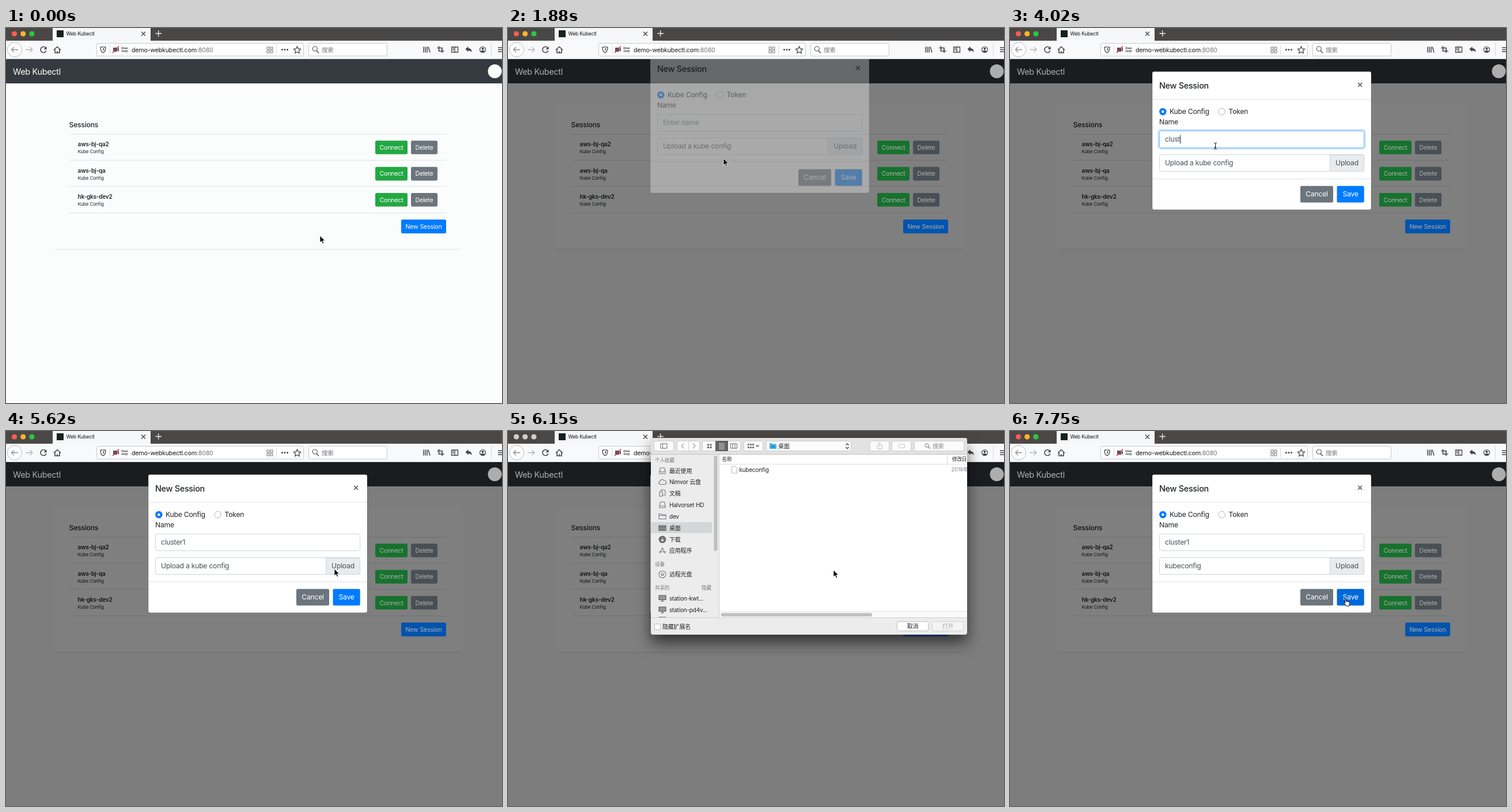
Animation of 861x650 px, one loop 8 s. Source, as an HTML page:

```html
<!DOCTYPE html>
<html lang="en">
<head>
<meta charset="utf-8">
<title>Web Kubectl</title>
<style>
html, body { margin: 0; width: 100%; height: 100%; overflow: hidden; background: #fbfcfc; }
svg { display: block; width: 861px; height: 650px; }
text { font-family: Inter, "Noto Sans CJK SC", "Noto Sans CJK", sans-serif; letter-spacing: -.02em; white-space: pre; }
#card { fill: #fbfcfc; }
.dim #card { fill: #fff; }
.dim .lit { filter: brightness(.68); }
#backdrop { visibility: hidden; }
.dim #backdrop { visibility: visible; }
.line { fill: none; stroke: #45454a; stroke-width: 1.3; }
</style>
</head>
<body>
<svg id="stage" viewBox="0 0 861 650"></svg>
<script>
const INK = '#212529', RULE = '#dee2e6', BLUE = '#007bff', BLUE_HOVER = '#0069d9', GREY = '#6c757d';

const rect = (x, y, w, h, fill, more = '') =>
  `<rect x="${x}" y="${y}" width="${w}" height="${h}" fill="${fill}" ${more}/>`;
const box = (x, y, w, h, fill, stroke, rx = 3, more = '') =>
  rect(x + .5, y + .5, w - 1, h - 1, fill, `stroke="${stroke}" rx="${rx}" ${more}`);
const circle = (x, y, r, fill, more = '') => `<circle cx="${x}" cy="${y}" r="${r}" fill="${fill}" ${more}/>`;
const line = (d, more = '') => `<path class="line" d="${d}" ${more}/>`;
const shape = (d, fill, more = '') => `<path d="${d}" fill="${fill}" ${more}/>`;
// y is the middle of the capital letters
const text = (x, y, s, size, fill = INK, more = '') =>
  `<text x="${x}" y="${y + size * .36}" font-size="${size}" fill="${fill}" ${more}>${s}</text>`;
const group = (id, inner, more = '') => `<g id="${id}" ${more}>${inner}</g>`;
const button = (x, y, w, h, fill, label, size, id = '') =>
  rect(x, y, w, h, fill, `rx="2.3" ${id && `id="${id}"`}`) +
  text(x + w / 2, y + h / 2, label, size, '#fff', 'text-anchor="middle"');

const LIGHTS = ['#fc5b53', '#fdb528', '#2ac840'];

function chrome() {
  return rect(0, 0, 861, 22, '#4a4846') + rect(81, 0, 170, 22, '#f6f7f8') +
    LIGHTS.map((c, i) => circle(14.5 + i * 15.2, 10, 4.6, c, 'class="light"')).join('') +
    rect(88, 4, 12, 12, '#16211c') +
    text(104.5, 10, 'Web Kubectl', 8.5, '#111') +
    line('M235 6.5l7 7m0-7l-7 7') +
    line('M259.5 9.5h10.5M264.7 4.3v10.5', 'style="stroke:#eee"') +
    rect(0, 22, 861, 31, '#f8f9fa') + rect(0, 53, 861, 1, '#c9cbcc') +
    circle(15, 37.5, 12.6, '#fdfdfd', 'stroke="#bbb"') +
    line('M21 37.5H9.5m4.5-4.5l-4.5 4.5l4.5 4.5', 'style="stroke:#8e8e92"') +
    line('M34.5 37.5H46m-4.5-4.5l4.5 4.5l-4.5 4.5', 'style="stroke:#b5b5b8"') +
    line('M69.2 34.8A5 5 0 1 0 69.8 39', 'style="stroke-width:1.6"') + shape('M70.5 32v5h-5z', '#45454a') +
    line('M83 38l6-5.5l6 5.5M85 37v6h8v-6M89 43v-3', 'style="stroke-width:1.6"') +
    box(157, 26, 360, 23, '#fff', '#c8c9ca', 2) +
    line('M164 33.5q4.500-.5 4.500-1q0 .5 4.500 1q0 7-4.500 9.500q-4.500-2.500-4.500-9.500z') + shape('M168.500 35h2q0 3.500-2 5z', '#45454a') +
    rect(180, 29, 1, 17, '#d8d8da') +
    shape('M186 34h7v7h-7zm7.500 2l2.500-2v7l-2.500-2z', '#55555a') + line('M185 43L196 31.500', 'style="stroke:#d7264c;stroke-width:1.600"') +
    line('M205 35h6.500M200.500 40h6') + circle(202.5, 35, 1.7, 'none', 'stroke="#45454a"') + circle(209, 40, 1.7, 'none', 'stroke="#45454a"') +
    text(218, 38, 'demo-webkubectl.com<tspan fill="#76767a">:8080</tspan>', 10.7, '#18181b') +
    [[452.5, 32.5], [458.5, 32.5], [452.5, 38.5], [458.5, 38.5]].map(([x, y]) => rect(x + .5, y + .5, 4, 4, 'none', 'stroke="#77777a"')).join('') +
    rect(469, 29, 1, 17, '#d8d8da') +
    [479.5, 484, 488.5].map(x => circle(x, 37.5, 1.5, '#45454a')).join('') +
    line('M505.500 32l1.800 3.800l4.200.6l-3 2.900l.7 4.200l-3.700-2l-3.700 2l.7-4.200l-3-2.900l4.200-.6z') +
    box(525, 26, 137, 23, '#fff', '#c8c9ca', 2) +
    circle(536.3, 36, 4, 'none', 'stroke="#55555a" stroke-width="1.2"') + line('M539 39l4 4.500') +
    text(548, 38, '搜索', 10.5, '#77777b') +
    line('M725 32.500v10M728 32.500v10M731 32.500v10M733 32.500l3 10', 'style="stroke-width:1.500"') +
    line('M751.500 31.500v8.500h9M748.500 34.500h8.500v8.500', 'style="stroke-width:1.700"') +
    line('M773.500 33h11v9h-11zM779 33v9M775 35.500h2.500M775 38h2.500') +
    shape('M797.500 36.500l5-4.500v3q6 0 6 7q-2-3-6-3v2.500z', '#45454a') +
    circle(827.5, 37.5, 5, 'none', 'stroke="#45454a" stroke-width="1.200"') + circle(827.5, 36, 2, '#45454a') +
    shape('M823.500 40.500q4-3.500 8 0q-4 3.500-8 0z', '#45454a') +
    rect(842, 26, 1, 23, '#d8d8da') +
    line('M854 34h7M854 37.500h7M854 41h7');
}

const SESSIONS = [['aws-bj-qa2', 184], ['aws-bj-qa', 229.6], ['hk-gks-dev2', 274.8]];

function page() {
  const rows = SESSIONS.map(([name, y]) =>
    rect(110, Math.floor(y) - .3, 654, 1, RULE) +
    text(124.6, y + 17.4, name, 10, INK, 'font-weight="600"') +
    text(124.6, y + 30.3, 'Kube Config', 8)).join('');
  const buttons = SESSIONS.map(([, y]) =>
    button(641, y + 11.2, 56, 23.6, '#22a843', 'Connect', 10.7) +
    button(703, y + 11.2, 46, 23.6, GREY, 'Delete', 10.7)).join('');
  return rect(0, 53, 861, 597, '#fbfcfc') + rect(0, 53, 861, 43, '#343a40') +
    rect(83, 134, 708, 250.3, '#000', 'rx="4" opacity=".12"') +
    rect(82, 133, 710, 250.2, '', 'rx="4" id="card"').replace('fill=""', '') +
    text(109.5, 168, 'Sessions', 12.2, INK, 'font-weight="500"') + rows + rect(110, 320, 654, 1, RULE) +
    rect(0, 53, 861, 597, '#000', 'id="backdrop" opacity=".5"') +
    `<g class="lit">${text(12, 75.5, 'Web Kubectl', 14.4, '#fff')}${circle(848.5, 75, 12, '#fff')}${buttons}` +
    button(686, 332, 78, 24, BLUE, 'New Session', 10.7, 'create') + '</g>';
}

function modal() {
  return rect(247, 75.5, 380, 239.5, '#fff', 'rx="3" stroke="#000" stroke-opacity=".2"') +
    text(259, 100, 'New Session', 14.4, INK, 'font-weight="500"') +
    line('M604.200 95l6.800 6.800m0-6.800l-6.800 6.800', 'style="stroke:#777;stroke-width:2"') +
    rect(247, 123, 380, 1, RULE) + rect(247, 261, 380, 1, RULE) +
    circle(265.3, 145, 6.2, BLUE) + circle(265.3, 145, 2.3, '#fff') + text(277, 145, 'Kube Config', 12.2) +
    circle(367.6, 145, 5.8, '#fff', 'stroke="#adb5bd"') + text(379.5, 145, 'Token', 12.2) +
    text(259, 163, 'Name', 12.2) +
    rect(257.8, 176.8, 358.4, 32.4, 'none', 'id="ring" rx="4.500" stroke="#bfdeff" stroke-width="2.600"') +
    box(259, 178, 356, 30, '#fff', '#ced4da', 3, 'id="field"') +
    text(269, 193, '', 12.2, INK, 'id="name"') + rect(269, 185.5, 1, 15, '#222', 'id="caret"') +
    box(259, 219, 356, 30, '#fff', '#ced4da') + text(269, 234, '', 12.2, '#495057', 'id="file"') +
    shape('M555.500 220H612q2.500 0 2.500 2.500V246q0 2.500-2.500 2.500H555.500z', '#e9ecef', 'stroke="#ced4da"') +
    text(585, 234, 'Upload', 12.2, '#495057', 'text-anchor="middle"') +
    button(504, 273.7, 57, 28.8, GREY, 'Cancel', 12.2) +
    button(567.5, 273.7, 47.2, 28.8, BLUE, 'Save', 12.2, 'save');
}

// sidebar icons are drawn around the origin
const ICONS = {
  tray: 'M-5 5v-5l1.500-5h7l1.500 5v5zM-5 1h3l1 1.500h2l1-1.500h3',
  cloud: 'M-4 4a2.800 2.800 0 0 1 0-5.500a3.800 3.800 0 0 1 7-1a3 3 0 0 1 1 6.500z',
  pages: 'M-5 5v-8h5v8zM-2-3v-3h5l2 2v7h-5',
  disk: 'M-5 5v-3l1.500-7h7l1.500 7v3zM-5 2h10',
  folder: 'M-6 4.500v-9h4l1 1.500h7v7.500zM-6-1.500h12',
  desk: 'M-6-4h12v8.500h-12zM-6-1.500h12M-4 2h8',
  down: 'M0-3v6m-2.500-2.500l2.500 2.500l2.500-2.500',
  apps: 'M-5 5l5-10l5 10M-6.500 2h13',
  disc: 'M-6 0a6 6 0 1 0 12 0a6 6 0 1 0-12 0M-2 0a2 2 0 1 0 4 0a2 2 0 1 0-4 0',
  screen: 'M-6-5h12v7.500h-12zM-3 5h6M0 3v2'
};
const PLACES = [
  ['tray', 69, '最近使用'], ['cloud', 88.5, 'Nimvor 云盘'], ['pages', 108, '文稿'], ['disk', 128, 'Halvorset HD'],
  ['folder', 148, 'dev'], ['desk', 168, '桌面'], ['down', 188, '下载'], ['apps', 207.5, '应用程序'],
  ['disc', 248.5, '远程光盘'], ['screen', 290, 'station-kwt...'], ['screen', 310, 'station-pd4v...']
];

function place([icon, y, label]) {
  const tint = icon === 'down' ? ['#6a6a6a', '#fff'] : icon === 'screen' || icon === 'desk' ? ['none', '#555'] : ['none', '#777'];
  return (icon === 'down' ? circle(268, y, 6.3, tint[0]) : '') +
    `<path transform="translate(268 ${y})" d="${ICONS[icon]}" fill="${icon === 'screen' || icon === 'desk' ? '#999' : 'none'}" stroke="${tint[1]}" stroke-width="1.1"/>` +
    text(280, y, label, 10, '#222');
}

function sheet() {
  const tool = (x, w) => box(x, 17, w, 18, '#fcfcfc', '#cdcdcd');
  const heading = (x, y, s) => text(x, y, s, 8.6, '#777', 'font-weight="500"');
  return rect(248, 12, 549, 341, '#ececec', 'rx="4" style="filter:drop-shadow(0 14px 13px rgba(0,0,0,.6))"') +
    shape('M248 40V16q0-4 4-4H793q4 0 4 4V40z', '#e2e2e2') + rect(248, 40, 549, 1, '#c4c4c4') +
    tool(253, 35) + line('M265 22h11v8h-11zM268.500 22v8', 'style="stroke:#666;stroke-width:1"') +
    tool(293, 40) + rect(313, 17, 1, 18, '#ccc') + line('M305 22l-4 4l4 4M321 22l4 4l-4 4', 'style="stroke:#999;stroke-width:1.100"') +
    tool(337, 67) + rect(360, 17, 22, 18, '#636363') +
    [346, 350.5].map(x => rect(x, 22.5, 3, 3, '#666') + rect(x, 27, 3, 3, '#666')).join('') +
    line('M366 22h10M366 25h10M366 28h10M366 31h10', 'style="stroke:#eee;stroke-width:1"') +
    line('M386.500 22h11v8h-11zM390 22v8M394 22v8', 'style="stroke:#666;stroke-width:1"') +
    tool(409, 34) + [0, 1, 2].map(i => rect(416 + i * 4, 22, 3, 3, '#777') + rect(416 + i * 4, 27, 3, 3, '#777')).join('') +
    line('M430.500 24.500l2.500 2.500l2.500-2.500', 'style="stroke:#555"') +
    tool(448, 148) + shape('M454 21h4l1 1.500h7v8.500h-12z', '#45b4e8') + rect(457, 25, 6, 4, '#2693cb') + text(469, 26, '桌面', 10, '#222') +
    line('M586.500 24.500l2.500-2.500l2.500 2.500M586.500 28l2.500 2.500l2.500-2.500', 'style="stroke:#444"') +
    tool(628, 34) + line('M643 24h-2v7h8v-7h-2M645 28v-8m-2 2l2-2l2 2', 'style="stroke:#bbb;stroke-width:1"') +
    tool(666, 34) + line('M677 26l2.500-3h9v6h-9z', 'style="stroke:#c4c4c4;stroke-width:1"') +
    tool(705, 87) + circle(727, 25, 3.2, 'none', 'stroke="#777"') + line('M729.500 27.500l3 3', 'style="stroke:#777"') + text(737, 26, '搜索', 10, '#888') +
    rect(248, 158, 106, 19, '#d4d7d8') + heading(255, 51, '个人收藏') + heading(255, 231, '设备') +
    heading(255, 272, '共享的') + heading(336, 272, '隐藏') + PLACES.map(place).join('') +
    rect(262, 322, 12, 1.5, '#777') + rect(357.5, 43, 6, 165, '#bfbfbf', 'rx="3"') +
    rect(366, 41, 431, 282, '#fff') + rect(366, 41, 1, 282, '#d0d0d0') +
    text(371.5, 49, '名称', 8.6, '#222') + rect(762, 41, 1, 16, '#d5d5d5') + text(771, 49, '修改日', 8.6, '#222') +
    rect(367, 57, 430, 1, '#ddd') + rect(367, 58, 430, 18.5, '#0b60d8', 'id="pick"') +
    shape('M388.500 61.500h6l3 3v8.500h-9z', '#fff', 'stroke="#b5b5b5"') +
    text(401.5, 67, 'kubeconfig', 10, '#222', 'id="entry"') +
    `<svg x="760" y="58" width="37" height="18">${text(9.5, 9, '2019年', 9.3, '#888', 'id="date"')}</svg>` +
    rect(367, 313, 430, 10, '#fafafa') + rect(367, 312.5, 430, 1, '#e3e3e3') + rect(369.5, 315.5, 262.5, 6, '#bfbfbf', 'rx="3"') +
    rect(248, 323, 549, 1, '#cfcfcf') + box(254, 334, 11, 11, '#fff', '#b5b5b5', 2) + text(268, 339, '隐藏扩展名', 10, '#222') +
    box(675, 330, 55, 17, '#fff', '#c0c0c0') + text(702.5, 338.5, '取消', 10, '#222', 'text-anchor="middle"') +
    box(736, 330, 55, 17, '#f4f4f4', '#d2d2d2', 3, 'id="open"') + text(763.5, 338.5, '打开', 10, '#aaa', 'text-anchor="middle" id="openLabel"');
}

const cursors = group('arrow', shape('M0 0V12l2.800-2.600l1.900 4.400l2-.8l-1.900-4.300H8.500z', '#000', 'stroke="#fff" stroke-width=".8"')) +
  group('hand', shape('M1.500 1q1.300-1 2 .4V5l5.500 1.200q1 .4.800 2l-1 5H4.200L.300 8.800q-.8-1.500.6-1.800l1 .9z', '#fff', 'stroke="#000" stroke-width="1"')) +
  group('beam', line('M-2.500-5.500Q0-5.500 0-4Q0-5.500 2.500-5.500M0-4.500v9M-2.500 5.500Q0 5.500 0 4Q0 5.500 2.500 5.500M-1.500 2h3', 'style="stroke:#111;stroke-width:1"'));

const stage = document.getElementById('stage');
stage.innerHTML = '<clipPath id="view"><rect y="54" width="861" height="596"/></clipPath>' + page() +
  `<g clip-path="url(#view)">${group('modal', modal())}</g>` + chrome() + group('sheet', sheet()) + cursors;

const $ = id => document.getElementById(id);
const lights = [...document.querySelectorAll('.light')];

// time, cursor, x, y, what else changes from here on
const STEPS = [
  [0, 'arrow', 545, 360, { modal: 0, lift: 0, sheet: 0, name: '', file: 'Upload a kube config' }],
  [270, 'arrow', 561, 334],
  [540, 'arrow', 591, 313],
  [810, 'arrow', 631, 304],
  [1070, 'hand', 672, 297],
  [1340, 'hand', 702.5, 345.5, { createHover: true }],
  [1880, 'arrow', 374, 226, { createHover: false, modal: .33, lift: -29 }],
  [2150, 'arrow', 374, 226, { modal: 1, lift: 0 }],
  [2420, 'beam', 356.5, 204.5],
  [2690, 'beam', 356.5, 204.5, { focus: true, caret: true }],
  [2950, 'beam', 356.5, 204.5, { caret: false }],
  [3220, 'beam', 356.5, 204.5, { name: 'c', caret: true }],
  [3490, 'beam', 356.5, 204.5, { name: 'clu' }],
  [3750, 'beam', 356.5, 204.5, { name: 'clus' }],
  [4020, 'beam', 356.5, 204.5, { name: 'clust' }],
  [4290, 'beam', 356.5, 204.5, { name: 'cluster' }],
  [4550, 'beam', 356.5, 204.5, { name: 'cluster1' }],
  [4820, 'beam', 365, 200],
  [5090, 'arrow', 482, 224],
  [5350, 'arrow', 570, 239, { focus: false, caret: false }],
  [5620, 'arrow', 570, 239],
  [5880, 'arrow', 565, 241, { sheet: .5, scale: .9 }],
  [6150, 'arrow', 565, 241, { sheet: 1, scale: 1 }],
  [6410, 'arrow', 423, 74],
  [6680, 'arrow', 423, 66],
  [6950, 'arrow', 423, 66, { picked: true }],
  [7220, 'arrow', 423, 66, { sheet: 0, picked: false, file: 'kubeconfig' }],
  [7490, 'arrow', 540, 246],
  [7750, 'hand', 580, 290, { saveHover: true }]
];
let carried = {};
const STATES = STEPS.map(([time, cursor, x, y, patch]) => {
  carried = { ...carried, ...patch };
  return { ...carried, time, cursor, x, y };
});

const show = (id, on) => { $(id).style.display = on ? '' : 'none'; };
const fill = (id, color) => $(id).setAttribute('fill', color);

function draw(s) {
  for (const id of ['arrow', 'hand', 'beam']) show(id, id === s.cursor);
  $(s.cursor).setAttribute('transform', `translate(${s.x} ${s.y})`);
  stage.classList.toggle('dim', s.modal > 0);
  fill('create', s.createHover ? BLUE_HOVER : BLUE);
  fill('save', s.saveHover ? BLUE_HOVER : BLUE);

  show('modal', s.modal > 0);
  $('modal').setAttribute('opacity', s.modal);
  $('modal').setAttribute('transform', `translate(0 ${s.lift})`);
  $('name').textContent = s.name || 'Enter name';
  fill('name', s.name ? '#495057' : GREY);
  $('file').textContent = s.file;
  show('ring', s.focus);
  $('field').setAttribute('stroke', s.focus ? '#80bdff' : '#ced4da');
  show('caret', s.caret);
  if (s.caret) $('caret').setAttribute('x', 269 + (s.name ? $('name').getComputedTextLength() : 0));

  show('sheet', s.sheet > 0);
  $('sheet').setAttribute('opacity', s.sheet);
  $('sheet').setAttribute('transform', `translate(522 182) scale(${s.scale || 1}) translate(-522 -182)`);
  lights.forEach((light, i) => light.setAttribute('fill', s.sheet ? '#cfcfcf' : LIGHTS[i]));
  show('pick', s.picked);
  fill('entry', s.picked ? '#fff' : '#222');
  fill('date', s.picked ? '#fff' : '#888');
  fill('open', s.picked ? '#3b93f7' : '#f4f4f4');
  fill('openLabel', s.picked ? '#fff' : '#aaa');
}

const start = performance.now();
let current;
function tick() {
  const t = (performance.now() - start) % 8000;
  const state = STATES.findLast(s => s.time <= t);
  if (state !== current) draw(current = state);
  requestAnimationFrame(tick);
}
tick();
</script>
</body>
</html>
```
